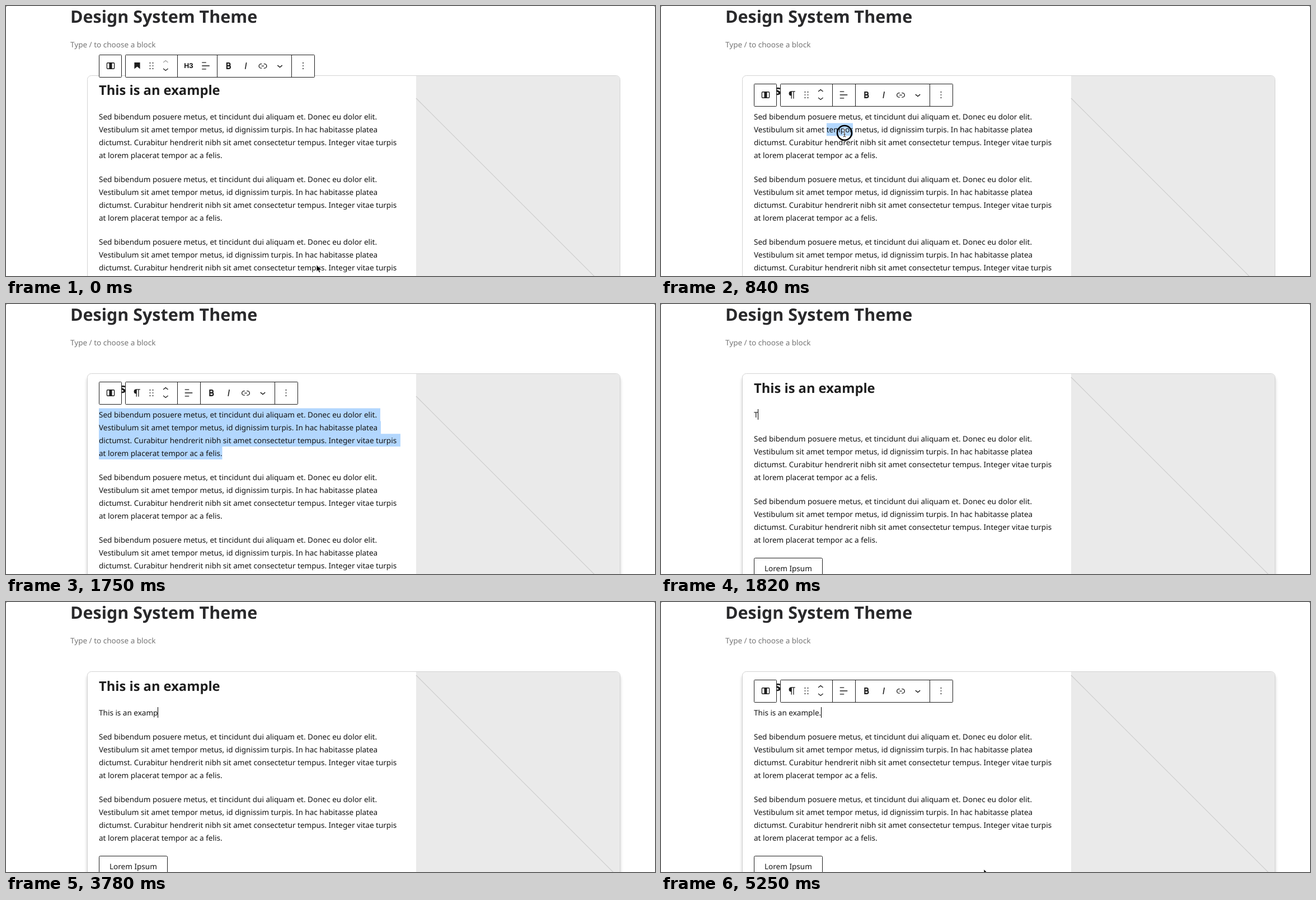
Animation of 1160x483 px, one loop 5.32 s. Source, as an HTML page:

```html
<!DOCTYPE html>
<html lang="en">
<head>
<meta charset="utf-8">
<title>Block editor</title>
<style>
  html, body { margin: 0; width: 100%; height: 100%; overflow: hidden; background: #fff; }
  svg { display: block; }
  text { font: 13.54px "Noto Sans", sans-serif; fill: #141414; white-space: pre; text-rendering: geometricPrecision; }
  .title { font-size: 30.48px; font-weight: 700; fill: #29292b; }
  .heading { font-size: 23.7px; font-weight: 700; fill: #1e1e1e; }
  .hint { fill: #757575; }
  .level { font: 700 12px Inter, sans-serif; text-anchor: middle; }
  .frame { fill: #fff; stroke: #1e1e1e; }
  .icon { fill: none; stroke: #1e1e1e; stroke-width: 1.6; }
  .solid { fill: #1e1e1e; stroke: none; }
  .dim { opacity: .4; }
  .mark { fill: #b3d7fe; }
  #shadow { fill: #000; filter: blur(2.2px); }
</style>
</head>
<body>
<svg width="1160" height="483" viewBox="0 0 1160 483">
  <path d="M0 0H2L0 2ZM1160 0h-2l2 2Z" fill="#999"/>
  <text class="title" x="115" y="30.4">Design System Theme</text>
  <text class="hint" x="115" y="74.3">Type / to choose a block</text>

  <rect id="shadow" x="143.5" y="130" width="956" height="400" rx="7"/>
  <rect x="145.5" y="124.5" width="952" height="400" rx="7" fill="#fff" stroke="#d3d3d3"/>
  <path d="M733 125H1091a6 6 0 0 1 6 6V483H733Z" fill="#eaeaea"/>
  <path id="diagonal" d="M733 165l400 400" stroke="#cbcbcb" stroke-width="1.1"/>

  <g id="allMark" class="mark">
    <path d="M166 186.6H669V209.5H670V232.3H705V255.1H386.5V278H166Z"/>
  </g>
  <rect id="wordMark" class="mark" x="296" y="209.5" width="47" height="22.8"/>

  <text class="heading" x="166" y="159.4">This is an example</text>
  <g id="first"></g>
  <g id="rest">
    <rect class="frame" x="166.5" y="523.5" width="122" height="42" rx="2"/>
    <text x="185" y="546.6">Lorem Ipsum</text>
  </g>
  <text id="typed" x="166" y="202.8"></text>
  <rect id="caret" y="188" width="1" height="19"/>

  <g id="headingBar"></g>
  <g id="paragraphBar"></g>

  <g id="pointer">
    <path id="arrow" d="M0 0v12.2l2.8-2.6 1.9 4.4 2.1-.9-1.9-4.2h3.9Z" stroke="#fff" stroke-width=".8"/>
    <g id="beam" fill="none">
      <path d="M-2.5-6.5Q0-6.5 0-4.5V5Q0 7-2.5 7M2.5-6.5Q0-6.5 0-4.5M0 5Q0 7 2.5 7M-1.5 2.5h3" stroke="#fff" stroke-width="2.4"/>
      <path d="M-2.5-6.5Q0-6.5 0-4.5V5Q0 7-2.5 7M2.5-6.5Q0-6.5 0-4.5M0 5Q0 7 2.5 7M-1.5 2.5h3" stroke="#222"/>
    </g>
    <circle id="ring" r="13" fill="none" stroke="#000" stroke-width="2.6"/>
  </g>
</svg>
<script>
const LOOP = 5320, STEP = 70;
const SENTENCE = "This is an example.";
const KEY_TIMES = [1820, 1960, 2100, 2240, 2310, 2520, 2590, 2730, 2800, 2940,
  3080, 3150, 3360, 3500, 3570, 3780, 3850, 3920, 4130];
const LINES = [
  "Sed bibendum posuere metus, et tincidunt dui aliquam et. Donec eu dolor elit.",
  "Vestibulum sit amet tempor metus, id dignissim turpis. In hac habitasse platea",
  "dictumst. Curabitur hendrerit nibh sit amet consectetur tempus. Integer vitae turpis",
  "at lorem placerat tempor ac a felis."
];
// Pointer stops: time, x, y
const PATH = [[0, 555, 463], [70, 600, 330], [140, 640, 150], [210, 480, 20], [280, 172, 50],
  [350, 250, 100], [420, 250, 100], [560, 305, 195], [630, 328, 227], [4900, 328, 227],
  [5040, 410, 315], [5250, 577, 478], [LOOP, 577, 478]];

// Icons on a 24-unit grid
const ICONS = {
  columns: '<rect x="4.2" y="5.8" width="15.6" height="12.4" rx="1.5"/><path class="solid" d="M9 5.8h6v12.4H9Z"/>',
  bookmark: '<path class="solid" d="M6 5V18.6L12 13.8L18 18.6V5Z"/>',
  pilcrow: '<path class="solid" d="M18.3 4H9.9Q5 4.4 5 8.9T9.7 13.8V20h1.5V5.5h2.9V20h1.5V5.5h2.7Z"/>',
  grip: '<path d="M9 5v14M15 5v14" stroke-width="2" stroke-dasharray="2 4"/>',
  up: '<path d="M7 5L12 1L17 5"/>',
  down: '<path d="M7 18L12 22L17 18"/>',
  align: '<path d="M4 5h8.9M4 12h16M4 19h8.9"/>',
  bold: '<path d="M8.3 6.1H12a2.7 2.7 0 0 1 0 5.6H8.3ZM8.3 11.9h4.3a2.8 2.8 0 0 1 0 5.8H8.3Z" stroke-width="2.5"/>',
  italic: '<path d="M13.4 5L11 19" stroke-width="1.9"/>',
  link: '<path d="M14 8h1.6a4.4 4.4 0 0 1 0 8.9H14M10 8H8.4a4.4 4.4 0 0 0 0 8.9H10M9.3 12.5h5.4"/>',
  more: '<path d="M7 11L12 15L17 11"/>',
  dots: '<path d="M12 5v14" stroke-width="2" stroke-dasharray="2 4"/>'
};

const el = Object.fromEntries([...document.querySelectorAll("[id]")].map(e => [e.id, e]));
const show = (e, on) => e.style.display = on ? "" : "none";
const between = (t, a, b) => t >= a && t < b;

const icon = (name, x, extra = "") =>
  `<g class="icon ${extra}" transform="translate(${x - 10.16} 9.84) scale(.8467)">${ICONS[name]}</g>`;

function toolbar(y, right, dividers, kind, tools) {
  const [upClass, body] = kind === "bookmark"
    ? ["dim", '<text class="level" x="326.5" y="24.4">H3</text>'] : ["", ""];
  return `<g transform="translate(0 ${y})">
    <rect class="frame" x="166.5" y=".5" width="40" height="40" rx="1"/>
    <rect class="frame" x="213.5" y=".5" width="${right - 213.5}" height="40" rx="1"/>
    <path class="frame" d="${dividers.map(x => `M${x} .5v40`).join("")}"/>
    ${icon("columns", 187)}${icon(kind, 234.5)}${icon("grip", 260)}
    ${icon("up", 285.3, upClass)}${icon("down", 285.3)}${body}
    ${tools.map(([name, x]) => icon(name, x)).join("")}</g>`;
}

const tools = (x, last) => [["align", x], ["bold", x + 41], ["italic", x + 71.5],
  ["link", x + 102], ["more", x + 132.5], ["dots", last]];
el.headingBar.innerHTML = toolbar(87, 551.5, [306.5, 377.5, 510.5], "bookmark", tools(357, 531));
el.paragraphBar.innerHTML = toolbar(139, 521.5, [306.5, 347.5, 480.5], "pilcrow", tools(326.5, 500.5));

const paragraph = n => LINES.map((line, i) =>
  `<text x="166" y="${202.8 + n * 112 + i * 22.95}">${line}</text>`).join("");
el.first.innerHTML = paragraph(0);
el.rest.innerHTML += paragraph(1) + paragraph(2);

function pointerAt(t) {
  const i = PATH.findIndex(p => p[0] > t);
  const [a, b] = [PATH[i - 1], PATH[i]];
  const k = (t - a[0]) / (b[0] - a[0]);
  return [a[1] + (b[1] - a[1]) * k, a[2] + (b[2] - a[2]) * k];
}

function draw() {
  const t = Math.floor(performance.now() % LOOP / STEP) * STEP;
  const typing = t >= 1820;

  show(el.first, !typing);
  el.rest.setAttribute("transform", `translate(0 ${typing ? -69 : 0})`);
  el.diagonal.setAttribute("transform", `translate(0 ${typing ? -34 : 0})`);
  el.shadow.style.opacity = t < 1260 ? 0 : t < 1330 ? .06 : .12;

  show(el.headingBar, t < 700);
  show(el.paragraphBar, between(t, 700, 1820) || t >= 4900);
  show(el.wordMark, between(t, 840, 910));
  show(el.allMark, between(t, 910, 1820));

  const text = SENTENCE.slice(0, KEY_TIMES.filter(k => k <= t).length);
  if (el.typed.textContent !== text) el.typed.textContent = text;
  show(el.caret, typing && !between(t, 4620, 5110));
  if (typing) el.caret.setAttribute("x", Math.floor(166 + el.typed.getComputedTextLength()));

  const overText = between(t, 350, 5040);
  show(el.pointer, t < 1680 || t >= 4900);
  show(el.arrow, !overText);
  show(el.beam, overText);
  show(el.ring, between(t, 700, 770) || between(t, 840, 980));
  el.pointer.setAttribute("transform", `translate(${pointerAt(t)})`);
  requestAnimationFrame(draw);
}
draw();
</script>
</body>
</html>
```
